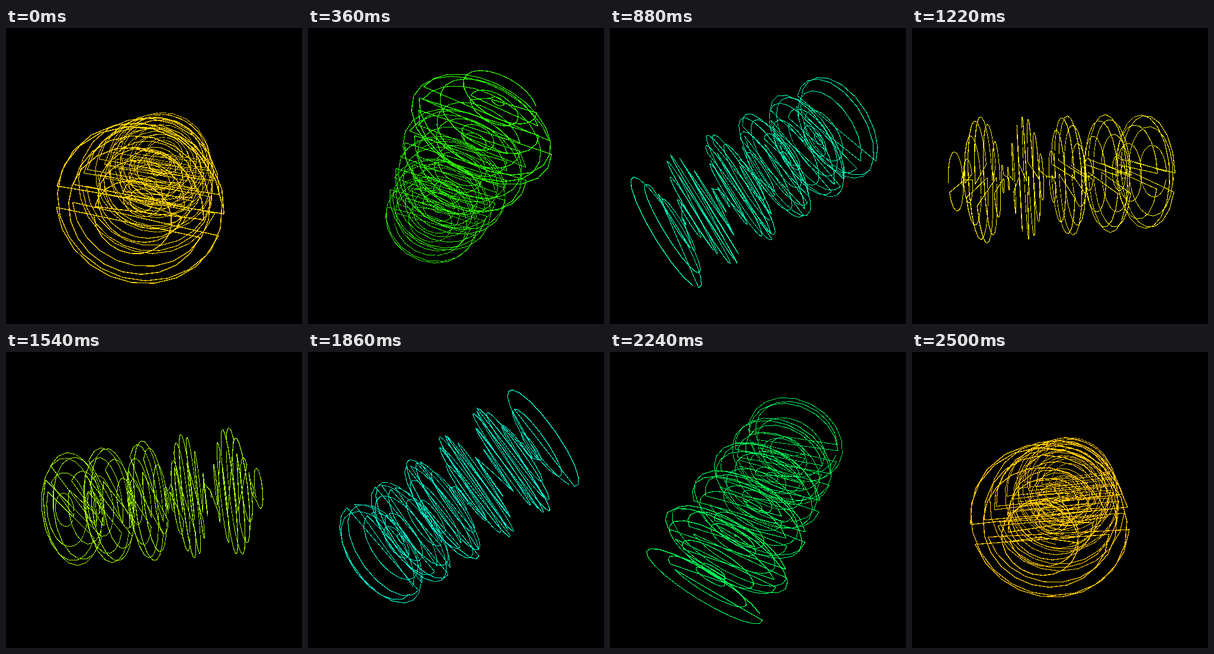
Write an HTML page that moves like this. It is 500 px wide and 500 px high and loops after 2.52 s.

```html
<!DOCTYPE html>
<html lang="en">
<head>
<meta charset="utf-8">
<title>Rotating rings</title>
<style>
html, body { margin: 0; width: 100%; height: 100%; overflow: hidden; background: #000; }
svg { display: block; width: 100vw; height: 100vh; }
</style>
</head>
<body>
<svg viewBox="0 0 500 500"><path id="coil" shape-rendering="crispEdges"/></svg>
<script>
const RINGS = 38, GAP = 9, RADIUS = 100, STEP = 0.3, POINTS = 21;
const EYE = 250 / Math.tan(Math.PI / 6);
const FRAME = 20, FRAMES = 126;
const coil = document.getElementById('coil');

// rotateY by half the angle, then rotateX by the angle, then perspective
function projector(angle) {
  const sx = Math.sin(angle), cx = Math.cos(angle);
  const sy = Math.sin(angle / 2), cy = Math.cos(angle / 2);
  return (x, y, z) => {
    const u = x * cy + z * sy, w = z * cy - x * sy;
    const v = y * cx - w * sx, depth = y * sx + w * cx;
    const scale = EYE / (EYE - depth);
    return { x: 250 + u * scale, y: 250 + v * scale, scale };
  };
}

// a line as a thin quad, wider where it is nearer
function quad(p, q) {
  const dx = q.x - p.x, dy = q.y - p.y;
  const len = Math.hypot(dx, dy) || 1;
  const nx = -dy / len / 2, ny = dx / len / 2;
  const corner = (o, side) =>
    (o.x + nx * o.scale * side).toFixed(2) + ' ' + (o.y + ny * o.scale * side).toFixed(2);
  return 'M' + corner(p, 1) + 'L' + corner(q, 1) + 'L' + corner(q, -1) + 'L' + corner(p, -1) + 'Z';
}

function draw(frame) {
  // the first step of the turn is a double one
  const angle = 0.05 * (frame && frame + 1) - 0.283;
  const project = projector(angle);
  const hue = 177 * Math.abs(Math.sin(angle));
  let last = null, d = '';
  for (let k = RINGS - 1; k >= 0; k--) {
    const z = (k - (RINGS - 1) / 2) * GAP;
    const r = RADIUS * Math.sin(angle - 0.165 - GAP * k);
    for (let j = 0; j < POINTS; j++) {
      const a = -j * STEP;
      const p = project(r * Math.cos(a), r * Math.sin(a), z);
      if (last) d += quad(last, p);
      last = p;
    }
  }
  coil.setAttribute('d', d);
  coil.setAttribute('fill', `hsl(${hue.toFixed(1)},100%,50%)`);
}

const start = performance.now();
let shown = -1;
function tick() {
  const frame = Math.floor((performance.now() - start) / FRAME) % FRAMES;
  if (frame !== shown) draw(shown = frame);
  requestAnimationFrame(tick);
}
tick();
</script>
</body>
</html>
```
